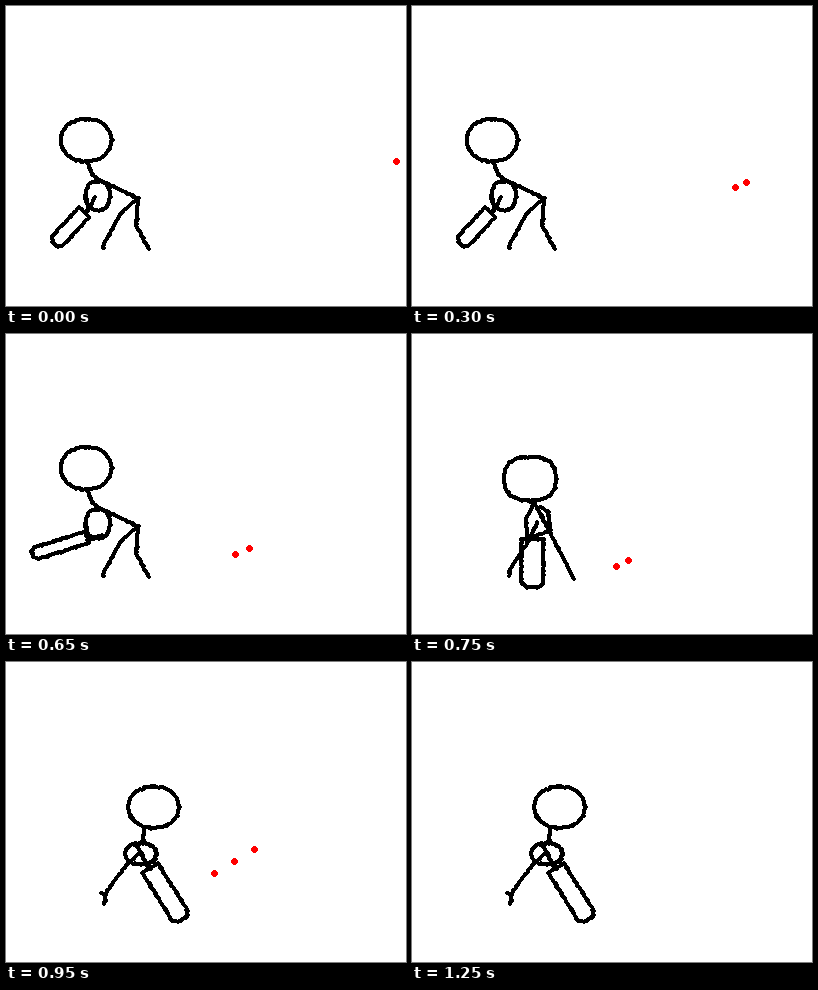
These frames come from a looping animation (400x300 px, 1300 ms). An HTML page with a canvas:

```html
<!DOCTYPE html>
<html lang="en">
<head>
<meta charset="utf-8">
<title>Batter</title>
<style>
  html, body { margin: 0; width: 100%; height: 100%; overflow: hidden; background: #fff; }
  canvas { display: block; width: 400px; height: 300px; image-rendering: pixelated; }
</style>
</head>
<body>
<canvas id="stage" width="400" height="300"></canvas>
<script>
const ctx = document.getElementById('stage').getContext('2d');
const STEP = 50, STEPS = 26;
const CONTACT = 17, GONE = 25;

let seed;
function random() {
  seed = (seed * 16807) % 2147483647;
  return seed / 2147483647;
}

// Hard-edged round pen that now and then slips one pixel.
function penDot(x, y) {
  x = Math.round(x) + (random() < 0.15);
  y = Math.round(y) + (random() < 0.15);
  ctx.fillRect(x - 2, y - 1, 4, 2);
  ctx.fillRect(x - 1, y - 2, 2, 4);
}

// Polyline through x, y pairs.
function line(...c) {
  for (let i = 2; i < c.length; i += 2) {
    const dx = c[i] - c[i - 2], dy = c[i + 1] - c[i - 1];
    const n = Math.ceil(Math.max(Math.abs(dx), Math.abs(dy)));
    for (let k = 0; k <= n; k++) penDot(c[i - 2] + dx * k / n, c[i - 1] + dy * k / n);
  }
}

// Ellipse whose diagonals swell with the bulge.
function ring(cx, cy, rx, ry, bulge = 0.02) {
  const points = [], sides = 16;
  for (let i = 0; i <= sides; i++) {
    const a = i / sides * 2 * Math.PI;
    const r = 1 + bulge * Math.sin(2 * a) ** 2;
    points.push(cx + rx * r * Math.cos(a), cy + ry * r * Math.sin(a));
  }
  line(...points);
}

// Bat from hand to tip, with a blunt rounded end.
function bat(hx, hy, tx, ty, half) {
  const length = Math.hypot(tx - hx, ty - hy);
  const dx = (tx - hx) / length, dy = (ty - hy) / length;
  const at = (along, side) => [hx + dx * along - dy * side, hy + dy * along + dx * side];
  line(...at(0, half), ...at(length, half), ...at(length + 4, half / 2),
    ...at(length + 4, -half / 2), ...at(length, -half), ...at(0, -half), ...at(0, half));
}

function crouch() {
  ring(80, 134, 25.5, 21.5);
  line(82, 157, 86, 168, 93, 174, 132, 192);
  line(132, 192, 115, 207, 98, 237, 97, 242);
  line(132, 192, 130, 220, 143, 243);
  ring(91.5, 189.5, 12.5, 15);
}

function ready() {
  crouch();
  line(89, 191, 80, 206);
  bat(78, 206, 51, 235, 7);
}

function windUp() {
  crouch();
  line(81, 206, 96, 201);
  bat(81, 203, 30, 219, 6);
}

function swing() {
  ring(118, 144.5, 26, 22, 0.1);
  line(121, 166, 162, 245);
  line(122, 168, 114, 185, 115, 203);
  line(128, 172, 136, 178, 138, 196, 118, 204, 97, 237, 97, 242);
  line(125, 188, 115, 208);
  bat(120, 205, 120.5, 249, 11);
}

function follow() {
  ring(147.5, 145, 25.5, 21);
  line(138, 166, 137, 178, 131, 184, 142, 206);
  ring(134.5, 191.5, 15.5, 11);
  line(133, 191, 120, 203, 100, 230, 98, 242);
  line(95, 231, 99, 232);
  bat(144, 206, 174, 254, 9);
}

function drawPose(s) {
  seed = 7;
  if (s < 8) ready();
  else if (s < 15) windUp();
  else if (s < CONTACT) swing();
  else follow();
}

function drawBall([x, y]) {
  x = Math.round(x);
  y = Math.round(y);
  for (let d = 1; d <= 3; d++) ctx.fillRect(x - d, y - 4 + d, 2 * d + 1, 9 - 2 * d);
}

// Keys are [step, x, y], joined by straight motion.
const pitch = [[0, 390, 155], [8, 301, 189], [13, 229, 220], [CONTACT, 178, 243]];
const hit = [[CONTACT, 168, 235], [19, 248, 187], [24, 437, 66]];

function along(keys, s) {
  const i = Math.max(1, keys.findIndex(k => k[0] >= s));
  const [s0, x0, y0] = keys[i - 1], [s1, x1, y1] = keys[i];
  const t = (s - s0) / (s1 - s0);
  return [x0 + (x1 - x0) * t, y0 + (y1 - y0) * t];
}

// The ball leaves ghosts reaching back one step, denser after the hit.
function drawBalls(s) {
  if (s >= GONE) return;
  const [keys, spacing] = s <= CONTACT ? [pitch, 1] : [hit, 0.5];
  for (let k = Math.max(0, s - 1); k <= s; k += spacing) drawBall(along(keys, k));
}

function draw(now) {
  const s = Math.floor(now / STEP) % STEPS;
  ctx.fillStyle = '#fff';
  ctx.fillRect(0, 0, 400, 300);
  ctx.fillStyle = '#000';
  drawPose(s);
  ctx.fillStyle = '#f00';
  drawBalls(s);
}

const start = performance.now();
function tick() {
  draw(performance.now() - start);
  requestAnimationFrame(tick);
}
tick();
</script>
</body>
</html>
```
